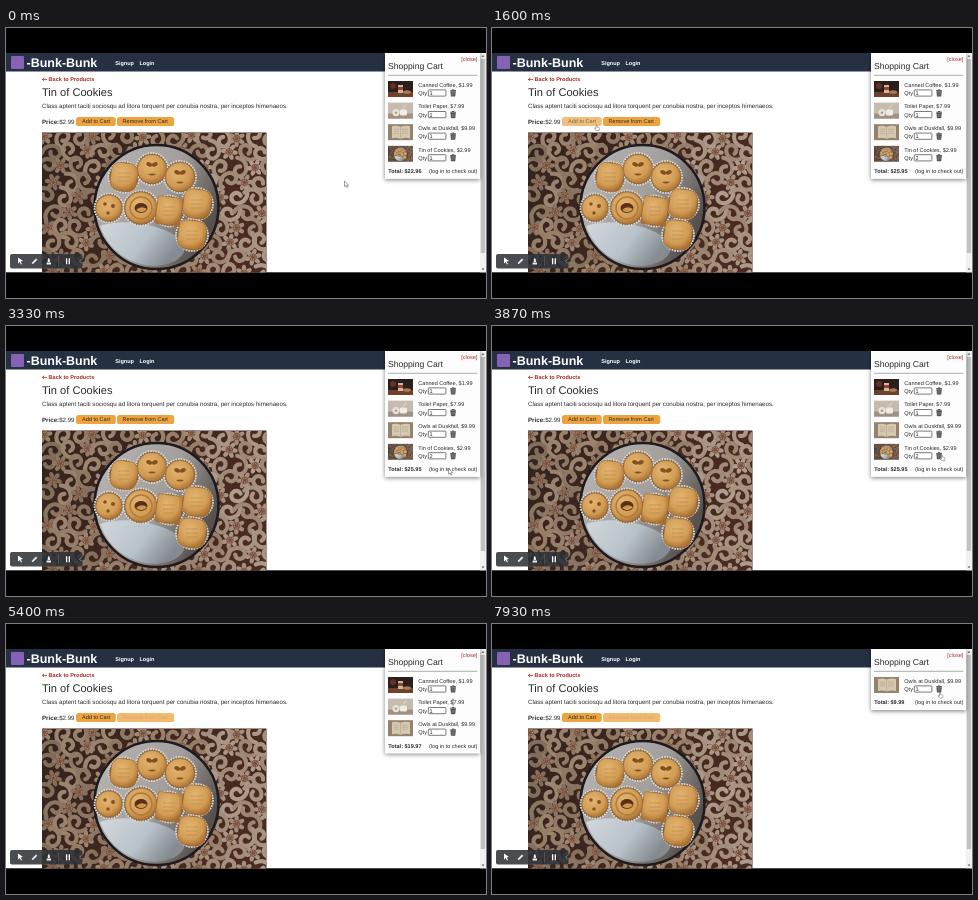
Write an HTML page that moves like this. It is 480x270 px and loops after 8000 ms.

```html
<!DOCTYPE html>
<html lang="en">
<head>
<meta charset="utf-8">
<title>Shop cart</title>
<style>
html, body { margin: 0; width: 100%; height: 100%; overflow: hidden; background: #000; }
svg { display: block; width: 100%; height: 100%; }
text { font-family: "Liberation Sans", Arial, sans-serif; font-size: 5.55px; fill: #2a2a2a; text-rendering: geometricPrecision; }
.b { font-weight: bold; }
.red { fill: #a8281f; }
.nav { fill: #fff; font-weight: bold; }
</style>
</head>
<body>
<svg viewBox="0 0 480 270">
  <defs>
    <clipPath id="photoClip"><rect x="36" y="104.5" width="224.5" height="140"/></clipPath>
    <filter id="shadow" x="-10%" y="-10%" width="120%" height="130%">
      <feDropShadow dx="0" dy="1.2" stdDeviation="2" flood-opacity=".5"/>
    </filter>
    <filter id="soft"><feGaussianBlur stdDeviation=".5"/></filter>
    <linearGradient id="cloth" x2="1" y2=".3">
      <stop offset="0" stop-color="#33231d"/><stop offset="1" stop-color="#4a2a21"/>
    </linearGradient>
    <linearGradient id="tinFill" x2="1" y2=".5">
      <stop offset="0" stop-color="#b9b7b5"/><stop offset=".6" stop-color="#a19e9c"/><stop offset="1" stop-color="#57504c"/>
    </linearGradient>
    <linearGradient id="paperFill" x2="1" y2=".4">
      <stop offset="0" stop-color="#d3d8dc"/><stop offset=".6" stop-color="#b8c2ca"/><stop offset="1" stop-color="#858b90"/>
    </linearGradient>
    <radialGradient id="dough" cx=".4" cy=".35" r=".7">
      <stop offset="0" stop-color="#e3b572"/><stop offset=".65" stop-color="#d19c54"/><stop offset="1" stop-color="#a66d30"/>
    </radialGradient>
  </defs>

  <rect width="480" height="270"/>
  <rect y="25" width="480" height="219.3" fill="#fff"/>
  <rect y="25" width="474" height="18.5" fill="#253042"/>
  <rect x="5" y="28" width="13" height="13" rx="1" fill="#8662b5"/>
  <text class="nav" x="20.5" y="38.6" style="font-size:12.5px">-Bunk-Bunk</text>
  <text class="nav" x="109.2" y="36.6">Signup</text>
  <text class="nav" x="133.4" y="36.6">Login</text>

  <path d="M41 51.4H36.4M38.2 49.8L36.4 51.4 38.2 53" fill="none" stroke="#a8281f" stroke-width=".8"/>
  <text class="b red" x="42.6" y="53.3">Back to Products</text>
  <text x="36" y="68.2" style="font-size:11.1px">Tin of Cookies</text>
  <text x="36" y="80" style="font-size:6.17px">Class aptent taciti sociosqu ad litora torquent per conubia nostra, per inceptos himenaeos.</text>
  <text x="36" y="95.6" style="font-size:6.17px"><tspan class="b">Price:</tspan>$2.99</text>
  <g id="add">
    <rect x="70" y="89" width="39.8" height="9" rx="2.6" fill="#eda440"/>
    <text x="76" y="95.4">Add to Cart</text>
  </g>
  <g id="remove">
    <rect x="111" y="89" width="57.2" height="9" rx="2.6" fill="#eda440"/>
    <text x="116.6" y="95.4">Remove from Cart</text>
  </g>

  <g id="photo" clip-path="url(#photoClip)"></g>

  <g id="scrollbar">
    <rect x="474" y="25" width="6" height="219.3" fill="#f1f1f1"/>
    <rect x="474.8" y="31" width="4.4" height="194" fill="#c1c1c1"/>
    <path d="M475.6 28.8l1.4-1.7 1.4 1.7zM475.6 240.6l1.4 1.7 1.4-1.7z" fill="#555"/>
  </g>

  <g id="cart">
    <rect id="card" x="379" y="25" width="95" fill="#fdfdfd" filter="url(#shadow)"/>
    <text class="red" x="471.3" y="33.2" text-anchor="end">[close]</text>
    <text x="382" y="41.2" style="font-size:8.6px">Shopping Cart</text>
    <path d="M382 47.3H471.3" stroke="#777" stroke-width=".6"/>
    <g id="rows"></g>
    <g id="foot">
      <text class="b" id="total" x="382.3" y="80.4"></text>
      <text x="471.4" y="80.4" text-anchor="end">(log in to check out)</text>
    </g>
  </g>

  <g id="recorder">
    <rect x="4" y="226" width="72.5" height="14.5" rx="2" fill="#2c3036" opacity=".86"/>
    <path d="M12 229.6l5 3.4-2.4.4 1.4 2.6-1 .5-1.3-2.6-1.7 1.7z" fill="#fff"/>
    <path d="M25.8 236l.5-1.8 3.7-3.8 1.3 1.3-3.7 3.8z" fill="#eee"/>
    <path d="M40.6 236.4v-1.8h4.4v1.8zM41.7 233.9v-2.2l1.1-2 1.1 2v2.2z" fill="#eee"/>
    <path d="M52.5 228v10.5" stroke="#666" stroke-width=".6"/>
    <path d="M60.6 230.3v6M63.3 230.3v6" stroke="#fff" stroke-width="1.3"/>
    <path d="M75.4 231.4l-1.7 1.9 1.7 1.9" fill="none" stroke="#aaa" stroke-width=".7"/>
  </g>

  <g id="cursor" stroke-linejoin="round">
    <path id="arrow" d="M0 0V5.7L1.4 4.5 2.3 6.5 3.2 6.1 2.3 4.2H4z" fill="#fff" stroke="#333" stroke-width=".45"/>
    <path id="hand" transform="scale(.85)" d="M-.6 .5Q0-.4.6.5V2.4L3 2.9Q3.6 3.1 3.5 4L3 6.6H-.4L-2.2 4.1Q-2.3 3.1-1.4 3.5L-.6 4.1z" fill="#fff" stroke="#444" stroke-width=".5"/>
    <path id="beam" d="M-1-2.8H1M0-2.8V2.8M-1 2.8H1" fill="none" stroke="#444" stroke-width=".5"/>
  </g>
</svg>

<script>
const LOOP = 8000, PITCH = 21.6;
const T_ADD = 1080, T_TIN = 4270, T_COFFEE = 6300, T_PAPER = 7330;
const $ = id => document.getElementById(id);

function seeded(seed) {
  return () => (seed = (seed * 16807) % 2147483647) / 2147483647;
}

// Lace: scrolls and small flowers in turn, over dark cloth.
function drawCloth() {
  const rnd = seeded(41);
  let lace = '';
  for (let row = 0; row < 10; row++) {
    for (let col = 0; col < 15; col++) {
      const x = 38 + col * 16 + (row % 2) * 8 + rnd() * 4;
      const y = 107 + row * 15 + rnd() * 4;
      const light = 42 + rnd() * 10 + col * 0.8;
      const tone = `hsl(28 18% ${light}%)`;
      let d = '';
      if ((row + col) % 3) {
        d = `<path d="M-9 6C-11-5 1-11 7-4C10 3 0 7-2 0" fill="none" stroke="${tone}" stroke-width="4.2" stroke-linecap="round"/>`;
      } else {
        for (let i = 0; i < 6; i++) {
          d += `<ellipse cx="5.2" rx="3.4" ry="2.2" fill="${tone}" transform="rotate(${i * 60})"/>`;
        }
        d += '<circle r="3.6" fill="#7b5241"/><circle r="2.4" fill="none" stroke="#a98d75" stroke-width="1" stroke-dasharray="1 1"/>';
      }
      lace += `<g transform="translate(${x} ${y}) rotate(${rnd() * 360})">${d}</g>`;
    }
  }
  return `<rect x="36" y="104" width="225" height="141" fill="url(#cloth)"/><g filter="url(#soft)">${lace}</g>`;
}

function drawCookie([x, y, r, kind]) {
  const edge = 'fill="url(#dough)" stroke="#a06a30" stroke-width=".6"';
  const hole = 'fill="#85501f"';
  const w = kind === 'square' ? r * 0.9 : r * 0.95;
  let s = kind === 'square' || kind === 'lines'
    ? `<rect x="${-w}" y="${-r}" width="${2 * w}" height="${2 * r}" rx="${kind === 'square' ? 2 : r * 0.6}" ${edge} transform="rotate(8)"/>`
    : `<circle r="${r}" ${edge}/>`;
  if (kind === 'pretzel') {
    s += `<ellipse cx="-4.5" cy="-3" rx="3" ry="2.2" ${hole} transform="rotate(25)"/><ellipse cx="4.5" cy="-3" rx="3" ry="2.2" ${hole} transform="rotate(-25)"/>` +
      `<path d="M-4 5Q0 8 4 5Q0 4-4 5" ${hole}/>`;
  } else if (kind === 'swirl') {
    s += '<circle r="11" fill="none" stroke="#b07a3a" stroke-width="1.4"/><ellipse rx="6.5" ry="5" fill="#5a3118"/><path d="M-5 2Q0-3 6 1Q2 7-5 2" fill="#cf9850"/>';
  } else if (kind === 'chips') {
    s += `<circle cx="-4" cy="-4" r="1.8" ${hole}/><circle cx="4" cy="-2" r="2" ${hole}/><circle cx="-1" cy="5" r="1.7" ${hole}/>`;
  } else {
    s += '<path d="M-6-4H6M-6 0H6M-6 4H6" stroke="#b98543" stroke-width=".6"/>';
  }
  return `<g transform="translate(${x} ${y})">${s}</g>`;
}

function drawTin() {
  const cookies = [
    [118, 149, 14, 'lines'], [146, 141, 14.5, 'pretzel'], [174, 149, 14.5, 'pretzel'],
    [103, 180, 13, 'chips'], [135, 180, 16, 'swirl'], [163, 183, 14, 'square'],
    [191, 176, 14.5, 'lines'], [186, 207, 14.5, 'lines']
  ];
  let out = '<circle cx="150.5" cy="179" r="62" fill="url(#tinFill)" stroke="#1d1b20" stroke-width="2.6"/>' +
    '<path d="M94 198Q120 190 150 199T178 224Q172 236 150 238Q108 236 94 198" fill="url(#paperFill)"/>';
  for (const [x, y, r] of cookies) {
    out += `<circle cx="${x}" cy="${y}" r="${r + 1.5}" fill="#75604c" stroke="#d9d5cf" stroke-width="1.8" stroke-dasharray="1.8 .9"/>`;
  }
  return out + cookies.map(drawCookie).join('');
}

// Thumbnails share a 25 by 16 box.
const thumbs = {
  coffee: '<rect width="25" height="16" fill="#2b1f1c"/><rect y="11" width="25" height="5" fill="#70402a"/>' +
    '<circle cx="5" cy="5" r="3" fill="#6a3024"/><rect x="10" y="4" width="5" height="8" fill="#c9b8a4"/>' +
    '<rect x="10" y="6" width="5" height="3" fill="#a3402c"/><ellipse cx="19" cy="11" rx="4" ry="1.8" fill="#ad7a55"/>',
  paper: '<rect width="25" height="16" fill="#c6bbae"/><rect y="11" width="25" height="5" fill="#a09282"/>' +
    '<circle cx="8" cy="10" r="3.6" fill="#e8e2da"/><circle cx="8" cy="10" r="1.2" fill="#a89a8a"/>' +
    '<rect x="12" y="7" width="7" height="6" rx="1.5" fill="#efebe5"/><path d="M15 6l3-4" stroke="#e4dcd0"/>',
  book: '<rect width="25" height="16" fill="#94826d"/><path d="M4 2Q8 1 12.5 2.5Q17 1 22 2V14Q17 13 12.5 14.5Q8 13 4 14Z" fill="#d5c8b0"/>' +
    '<path d="M12.5 3V14M6 5H11M6 7H11M6 9H11M14 5H20M14 7H20M14 9H20" stroke="#ab9a80" stroke-width=".5"/>',
  tin: '<use href="#photo" transform="scale(.1115 .114) translate(-36 -104.5)"/>'
};

const items = [
  { name: 'Canned Coffee', price: 1.99, pic: 'coffee', gone: T_COFFEE },
  { name: 'Toilet Paper', price: 7.99, pic: 'paper', gone: T_PAPER },
  { name: 'Owls at Duskfall', price: 9.99, pic: 'book', gone: Infinity },
  { name: 'Tin of Cookies', price: 2.99, pic: 'tin', gone: T_TIN }
];

const drawRow = it => `<g>
  <g transform="translate(382 53)">${thumbs[it.pic]}</g>
  <text x="412.3" y="58.8">${it.name}, $${it.price}</text>
  <text x="412.3" y="67.2">Qty</text>
  <rect x="422.3" y="61.9" width="17.6" height="6.2" rx=".6" fill="#fff" stroke="#444" stroke-width=".7"/>
  <text class="qty" x="423.6" y="67">1</text>
  <path d="M444.2 62.6H450M446 61.9H448.2" stroke="#333" stroke-width=".8"/>
  <path d="M444.7 63.4H449.5L449 68.3H445.2Z" fill="#555" stroke="#333" stroke-width=".4"/>
  <path d="M446.2 64.2V67.6M448 64.2V67.6" stroke="#bbb" stroke-width=".4"/>
</g>`;

$('photo').innerHTML = drawCloth() + drawTin();
$('rows').innerHTML = items.map(drawRow).join('');
items.forEach((it, i) => {
  it.el = $('rows').children[i];
  it.qtyEl = it.el.querySelector('.qty');
});

// Pointer path: time, x, y
const path = [
  [0, 338.5, 153], [120, 338.5, 153], [650, 104.5, 97], [1850, 104.5, 97],
  [2480, 393, 233.5], [2750, 393, 233.5], [3500, 450, 129], [4600, 450, 129],
  [5250, 447, 78], [5450, 447, 78], [6000, 448, 68.5], [LOOP, 448, 68.5]
];

function pointerAt(t) {
  const i = path.findIndex(p => p[0] > t);
  const [t0, x0, y0] = path[i - 1], [t1, x1, y1] = path[i];
  const k = (t - t0) / (t1 - t0), e = k * k * (3 - 2 * k);
  return [x0 + (x1 - x0) * e, y0 + (y1 - y0) * e];
}

const show = (el, on) => el.setAttribute('display', on ? 'inline' : 'none');

function draw(t) {
  let count = 0, total = 0;
  for (const it of items) {
    const on = t < it.gone;
    const qty = it.pic === 'tin' && t >= T_ADD ? 2 : 1;
    show(it.el, on);
    if (!on) continue;
    it.el.setAttribute('transform', `translate(0 ${count++ * PITCH})`);
    it.qtyEl.textContent = qty;
    total += qty * it.price;
  }
  $('total').textContent = `Total: $${total.toFixed(2)}`;
  $('foot').setAttribute('transform', `translate(0 ${(count - 1) * PITCH})`);
  $('card').setAttribute('height', 61 + (count - 1) * PITCH);

  const [x, y] = pointerAt(t);
  const overAdd = x > 70 && x < 110 && y > 89 && y < 98;
  const overBin = x > 444 && x < 451 && ((y - 52) % PITCH) > 9 && y < 52 + count * PITCH;
  const overText = !overBin && x > 412 && x < 471 && y > 53 && y < 52 + count * PITCH;
  $('add').setAttribute('opacity', overAdd ? 0.7 : 1);
  const gone = t >= T_TIN;
  $('remove').setAttribute('opacity', gone ? 0.75 : 1);
  $('remove').lastElementChild.style.fill = gone ? '#c58a45' : '';

  $('cursor').setAttribute('transform', `translate(${x} ${y})`);
  show($('hand'), overAdd || overBin);
  show($('beam'), overText);
  show($('arrow'), !overAdd && !overBin && !overText);
}

const start = performance.now();
function tick() {
  draw((performance.now() - start) % LOOP);
  requestAnimationFrame(tick);
}
tick();
</script>
</body>
</html>
```
